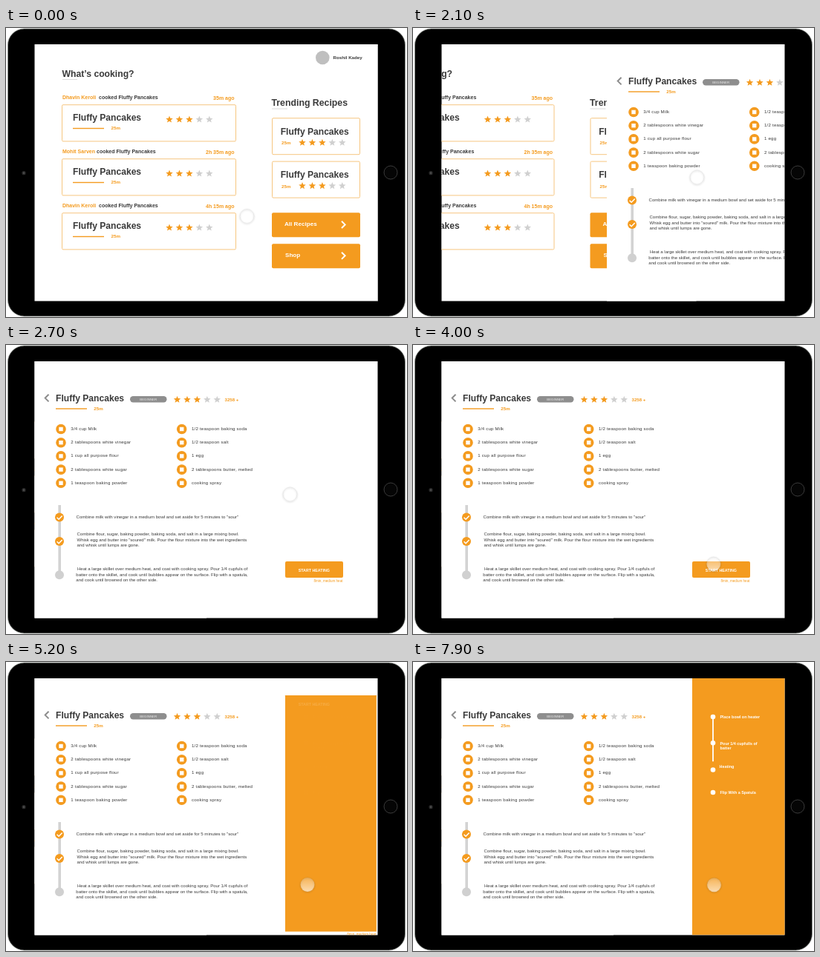
An HTML page that plays this animation: 540 by 390 pixels, repeating every 8000 ms.

```html
<!DOCTYPE html>
<html>
<head>
<meta charset="utf-8">
<style>
html, body { margin: 0; width: 100%; height: 100%; overflow: hidden; background: #fff; }
svg { display: block; }
text { font-family: "Liberation Sans", Arial, sans-serif; white-space: pre; }
</style>
</head>
<body>
<svg id="stage" width="540" height="390" viewBox="0 0 540 390"></svg>
<script>
const ORANGE = '#f49b1f', DARK = '#3a3a3a', GREY = '#d0d0d0';

// Markup helpers
const text = (x, y, size, str, fill = DARK, extra = '') =>
  `<text x="${x}" y="${y}" font-size="${size}" fill="${fill}" ${extra}>${str}</text>`;
const bold = (x, y, size, str, fill, extra = '') =>
  text(x, y, size, str, fill, 'font-weight="700" ' + extra);
const rect = (x, y, w, h, fill, extra = '') =>
  `<rect x="${x}" y="${y}" width="${w}" height="${h}" fill="${fill}" ${extra}/>`;
const circle = (x, y, r, fill, extra = '') =>
  `<circle cx="${x}" cy="${y}" r="${r}" fill="${fill}" ${extra}/>`;
const path = (d, stroke, width) =>
  `<path d="${d}" fill="none" stroke="${stroke}" stroke-width="${width}"/>`;
const outline = (x, y, w, h) =>
  rect(x, y, w, h, '#fff', 'rx="1.5" stroke="#f6c680" stroke-width="1"');

function star(x, y, fill) {
  const points = Array.from({ length: 10 }, (_, i) => {
    const r = i % 2 ? 2.2 : 5, a = (i / 5 - 0.5) * Math.PI;
    return (x + r * Math.cos(a)).toFixed(2) + ',' + (y + r * Math.sin(a)).toFixed(2);
  });
  return `<polygon points="${points.join(' ')}" fill="${fill}"/>`;
}
const rating = (x, y) =>
  [0, 1, 2, 3, 4].map(i => star(x + i * 13.45, y, i < 3 ? ORANGE : GREY)).join('');

function feedItem(y, name, nameEnd, ago) {
  return bold(76, y + 96, 7, name, ORANGE) +
    bold(nameEnd, y + 96, 7, 'cooked Fluffy Pancakes') +
    bold(307.5, y + 97, 7, ago, ORANGE, 'text-anchor="end"') +
    outline(75.5, y + 103.7, 234, 49.2) +
    bold(90, y + 125.3, 12.1, 'Fluffy Pancakes') +
    rect(90, y + 134.8, 42, 1.4, ORANGE) +
    bold(141.5, y + 137.3, 6.2, '25m', ORANGE) +
    rating(220, y + 123.5);
}

function trendItem(y) {
  return outline(358.5, y + 121.7, 118, 49) +
    bold(369.7, y + 143.5, 12.1, 'Fluffy Pancakes') +
    bold(371, y + 157.3, 6.2, '25m', ORANGE) +
    rating(399, y + 154.7);
}

function bigButton(x, y, label) {
  return rect(358, y, 119, 33, ORANGE, 'rx="2"') +
    bold(x, y + 17.6, 8.1, label, '#fff') +
    path(`M452 ${y + 11.5}l4.6 4.6-4.6 4.6`, '#fff', 2);
}

const home = rect(38, 22, 463, 347, '#fff') +
  circle(426.3, 40, 9.3, '#bfbfbf') +
  bold(440.5, 42.3, 6.2, 'Roshil Kadey') +
  bold(75.5, 66, 12.2, 'What’s cooking?') +
  rect(76, 69, 20, 1, '#dcdcdc') +
  feedItem(0, 'Dhavin Keroli', 125, '35m ago') +
  feedItem(73, 'Mohit Sarven', 122, '2h 35m ago') +
  feedItem(146, 'Dhavin Keroli', 125, '4h 15m ago') +
  bold(357.5, 105, 12.3, 'Trending Recipes') +
  rect(358, 108.5, 21, 1, '#dcdcdc') +
  trendItem(0) + trendItem(58.4) +
  bigButton(375, 249.3, 'All Recipes') +
  bigButton(376, 291.2, 'Shop');

const ingredients = [
  ['3/4 cup Milk', '2 tablespoons white vinegar', '1 cup all purpose flour',
    '2 tablespoons white sugar', '1 teaspoon baking powder'],
  ['1/2 teaspoon baking soda', '1/2 teaspoon salt', '1 egg',
    '2 tablespoons butter, melted', 'cooking spray']
].map((list, col) => list.map((label, row) => {
  const x = 74 + col * 162.7, y = 113.5 + row * 18.2;
  return circle(x, y, 6.8, ORANGE) + rect(x - 2.7, y - 2.7, 5.4, 5.4, '#fff') +
    text(x + 13.3, y + 1.5, 6.1, label, DARK, 'letter-spacing=".2"');
}).join('')).join('');

const lines = (x, y, size, list) =>
  list.map((str, i) => text(x, y + i * 7.6, size, str)).join('');
const check = y => circle(72, y, 6, ORANGE) +
  path(`M68.6 ${y + .2}l2.5 2.5 4.6-4.8`, '#fff', 1.5);

const recipe = rect(38, 22, 463, 347, '#fff') +
  path('M57.5 66.8l-4.8 4.8 4.8 4.8', '#8c8c8c', 2) +
  bold(67, 75.5, 12.1, 'Fluffy Pancakes') +
  rect(167, 69, 49.5, 8.4, '#8e8e8e', 'rx="4.2"') +
  text(191.7, 74.8, 4.4, 'BEGINNER', '#eee', 'text-anchor="middle"') +
  rating(230.5, 73.7) +
  bold(294.5, 75.6, 6.1, '3258 +', ORANGE) +
  rect(67, 85.3, 42, 1.4, ORANGE) +
  bold(118.3, 87.5, 6.2, '25m', ORANGE) +
  ingredients +
  rect(70.4, 216, 3.6, 94, '#d3d3d3') +
  check(232.5) + check(265) + circle(72, 310.3, 6, GREY) +
  lines(94.5, 233.7, 6.07, ['Combine milk with vinegar in a medium bowl and set aside for 5 minutes to "sour"']) +
  lines(95.5, 257.2, 6, [
    'Combine flour, sugar, baking powder, baking soda, and salt in a large mixing bowl.',
    'Whisk egg and butter into "soured" milk. Pour the flour mixture into the wet ingredients',
    'and whisk until lumps are gone.']) +
  lines(94.3, 304, 6, [
    ' Heat a large skillet over medium heat, and coat with cooking spray. Pour 1/4 cupfuls of',
    'batter onto the skillet, and cook until bubbles appear on the surface. Flip with a spatula,',
    'and cook until browned on the other side.']);

const guide = [74, 109.3, 145.5, 176].map(y => circle(404, y, 3.3, '#fff')).join('') +
  [[413.5, 75.7, 'Place bowl on heater'], [413.5, 111.7, 'Pour 1/4 cupfulls of'],
    [413.5, 118.2, 'batter'], [412.5, 142.5, 'Heating'], [413.5, 178.3, 'Flip With a Spatula']]
    .map(([x, y, str]) => bold(x, y, 5.4, str, '#fff')).join('');

const stage = document.getElementById('stage');
stage.innerHTML = `
  <defs>
    <clipPath id="screen"><rect x="38.5" y="22" width="462" height="346.5"/></clipPath>
    <filter id="soft" x="-50%" y="-50%" width="200%" height="200%"><feGaussianBlur stdDeviation=".8"/></filter>
    <linearGradient id="glass" x2="0" y2="1">
      <stop stop-color="#fff" stop-opacity=".25"/>
      <stop offset="1" stop-color="#fff" stop-opacity=".65"/>
    </linearGradient>
  </defs>` +
  rect(2.5, 1, 535, 388, '#000', 'rx="22" stroke="#8a8f8a" stroke-width=".8"') +
  circle(24, 195.7, 2.6, '#2b2b2b') + circle(24, 195.7, 1.1, '#555') +
  circle(518, 195, 9, '#050505', 'stroke="#3a3a3a" stroke-width="1"') +
  `<g clip-path="url(#screen)">
    <g id="home">${home}</g>
    <g id="recipe">${recipe}
      ${rect(376, 292, 78, 22, ORANGE, 'id="card"')}
      ${bold(393.7, 305.6, 5.3, 'START HEATING', '#fff', 'id="label"')}
      ${text(453.5, 319.5, 4.6, '8min, medium heat', ORANGE, 'id="note" text-anchor="end"')}
      <g id="guide">${guide}</g>
      ${rect(403.1, 74, 1.8, 0, '#fff', 'id="progress"')}
    </g>
    <g id="cursor">
      ${circle(0, .8, 9.4, 'none', 'stroke="#000" stroke-opacity=".2" stroke-width="1" filter="url(#soft)"')}
      ${circle(0, 0, 9.4, 'url(#glass)', 'stroke="#999" stroke-opacity=".25" stroke-width=".5"')}
    </g>
  </g>`;

const el = id => document.getElementById(id);
const set = (id, attrs) => {
  for (const key in attrs) el(id).setAttribute(key, attrs[key]);
};
const mix = (a, b, p) => a + (b - a) * p;
const ramp = (t, start, length) => Math.min(1, Math.max(0, (t - start) / length));

// cubic-bezier(.25, .1, .25, 1), solved by bisection
function ease(x) {
  const curve = (a, b, u) => 3 * a * u * (1 - u) ** 2 + 3 * b * u * u * (1 - u) + u ** 3;
  let lo = 0, hi = 1;
  for (let i = 0; i < 24; i++) {
    const mid = (lo + hi) / 2;
    if (curve(.25, .25, mid) < x) lo = mid; else hi = mid;
  }
  return curve(.1, 1, hi);
}
const eased = (t, start, length) => {
  const p = ramp(t, start, length);
  return p <= 0 || p >= 1 ? p : ease(p);
};

function draw(t) {
  const push = eased(t, 1950, 500);
  set('home', { transform: `translate(${-231 * push} 0)` });
  set('recipe', { transform: `translate(${462 * (1 - push)} 0)` });

  const grow = eased(t, 4391, 1250);
  const top = mix(292, 22, grow), bottom = mix(314, 368.5, grow), right = mix(454, 503, grow);
  set('card', { y: top, height: bottom - top, width: right - 376, rx: mix(2, 0, grow) });
  set('label', { y: top + 13.6, opacity: 1 - grow ** 2 });
  set('note', { x: right - .5, y: bottom + 5.5 });
  set('guide', { opacity: ramp(t, 5200, 500) });
  set('progress', { height: Math.max(0, (t - 5585) * .026) });

  const a = eased(t, 100, 1000), b = eased(t, 3350, 900), c = ramp(t, 7500, 400);
  const x = 324.5 + 58 * a + 23.5 * b - .5 * c;
  const y = 254 - 52.5 * a + 99 * b + .3 * c;
  set('cursor', { transform: `translate(${x} ${y})` });
}

const began = performance.now();
function tick() {
  draw((performance.now() - began) % 8000);
  requestAnimationFrame(tick);
}
tick();
</script>
</body>
</html>
```
